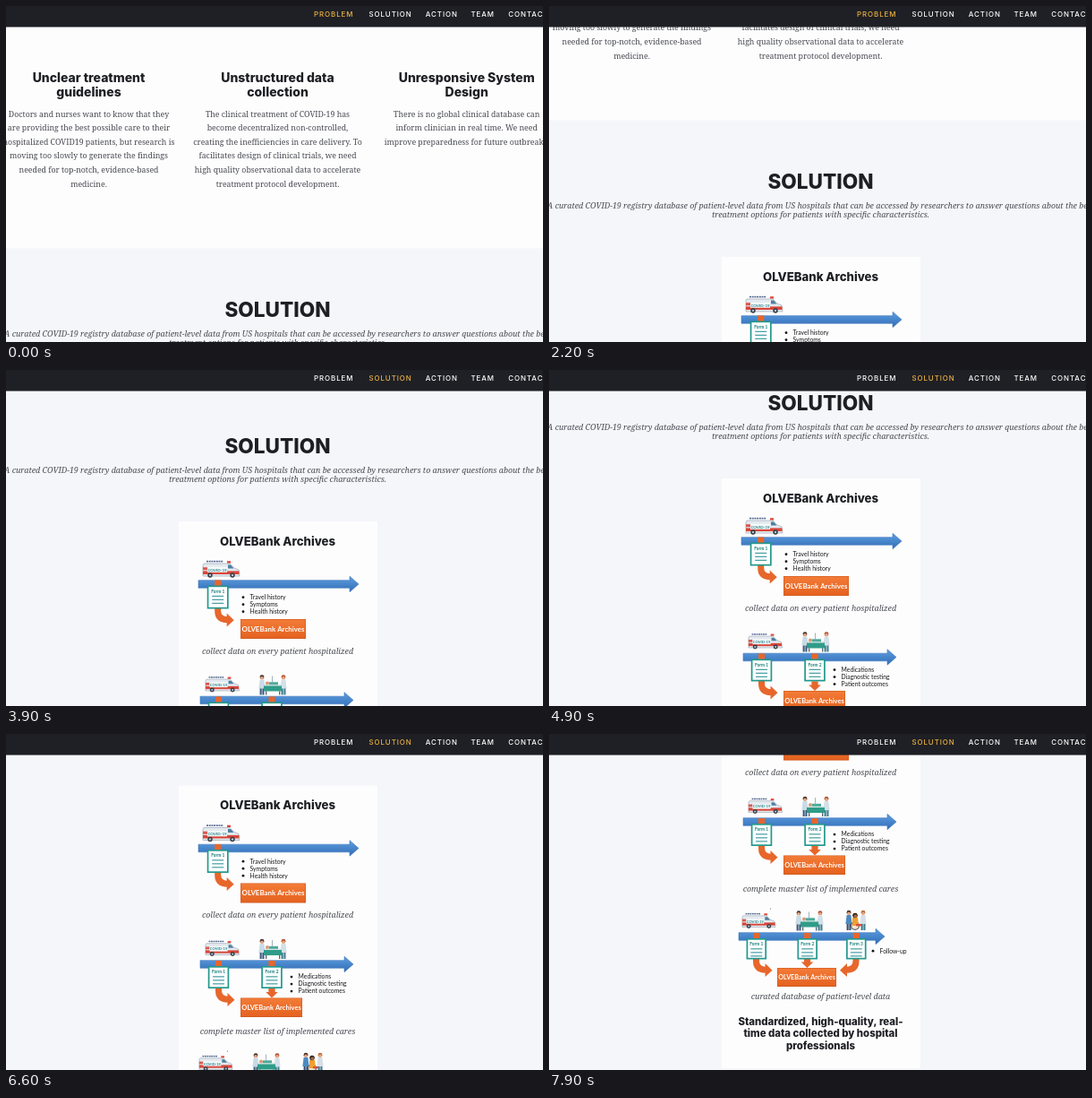
Animation of 600x375 px, one loop 8 s. Source, as an HTML page with a canvas:

```html
<!DOCTYPE html>
<html lang="en">
<head>
<meta charset="utf-8">
<title>Health registry page</title>
<style>
  html, body { margin: 0; width: 100%; height: 100%; overflow: hidden; background: #f5f6fa; }
  canvas { display: block; width: 600px; height: 375px; }
</style>
</head>
<body>
<canvas id="stage"></canvas>
<script>
const W = 600, H = 375, LOOP = 8000, STEP = 100;
const canvas = document.getElementById('stage');
const ctx = canvas.getContext('2d');
const ratio = window.devicePixelRatio || 1;
canvas.width = W * ratio;
canvas.height = H * ratio;

const HEAD = 'Inter, sans-serif', BODY = '"Noto Serif", serif', LABEL = 'Lato, sans-serif';
const INK = '#1d1f23', GREY = '#464a50', TEAL = '#23988c', ORANGE = '#e7662b';
const BRAND = 'OLVEBank Archives';
const MID = 303.5;

// Scroll distance at given times, joined by a monotone cubic curve.
const KEYS = [[0, 0], [700, 54], [900, 54], [1300, 80], [1400, 80], [2200, 143], [2900, 217],
  [3900, 254], [4900, 302], [6600, 365.5], [7700, 517.5], [7900, 524.5]];
const rate = i => (KEYS[i + 1][1] - KEYS[i][1]) / (KEYS[i + 1][0] - KEYS[i][0]);

function slope(i) {
  if (i === 0) return rate(0);
  if (i === KEYS.length - 1) return rate(i - 1);
  const a = rate(i - 1), b = rate(i);
  return a * b > 0 ? 2 * a * b / (a + b) : 0;
}

function scrollAt(t) {
  const last = KEYS.length - 2;
  let i = 0;
  while (i < last && t > KEYS[i + 1][0]) i++;
  const [t0, y0] = KEYS[i], [t1, y1] = KEYS[i + 1];
  const d = t1 - t0, u = Math.min(1, (t - t0) / d), v = 1 - u;
  return y0 * (1 + 2 * u) * v * v + slope(i) * d * u * v * v
    + y1 * u * u * (3 - 2 * u) - slope(i + 1) * d * u * u * v;
}

function text(str, x, y, font, color, align = 'left', spacing = 0) {
  ctx.font = font;
  ctx.fillStyle = color;
  ctx.textAlign = align;
  ctx.letterSpacing = spacing + 'px';
  ctx.fillText(str, x, y);
}

function lines(list, x, y, pitch, font, color) {
  list.forEach((str, i) => text(str, x, y + i * pitch, font, color, 'center'));
}

function rect(x, y, w, h, color) {
  ctx.fillStyle = color;
  ctx.fillRect(x, y, w, h);
}

function poly(points, color, edge) {
  ctx.fillStyle = color;
  ctx.beginPath();
  points.forEach(([x, y]) => ctx.lineTo(x, y));
  ctx.closePath();
  ctx.fill();
  if (edge) {
    ctx.strokeStyle = edge;
    ctx.lineWidth = .6;
    ctx.stroke();
  }
}

function disc(x, y, r, color) {
  ctx.fillStyle = color;
  ctx.beginPath();
  ctx.arc(x, y, r, 0, Math.PI * 2);
  ctx.fill();
}

function shade(y0, y1, top, bottom) {
  const g = ctx.createLinearGradient(0, y0, 0, y1);
  g.addColorStop(0, top);
  g.addColorStop(1, bottom);
  return g;
}

function problemSection() {
  rect(0, 0, W, 270.3, '#fefdfe');
  const columns = [
    [92.5, ['Unclear treatment', 'guidelines'],
      ['Doctors and nurses want to know that they', 'are providing the best possible care to their',
        'hospitalized COVID19 patients, but research is', 'moving too slowly to generate the findings',
        'needed for top-notch, evidence-based', 'medicine.']],
    [MID, ['Unstructured data', 'collection'],
      ['The clinical treatment of COVID-19 has', 'become decentralized non-controlled,',
        'creating the inefficiencies in care delivery. To', 'facilitates design of clinical trials, we need',
        'high quality observational data to accelerate', 'treatment protocol development.']],
    [514.7, ['Unresponsive System', 'Design'],
      ['There is no global clinical database can', 'inform clinician in real time. We need',
        'improve preparedness for future outbreaks.']]
  ];
  for (const [x, title, body] of columns) {
    lines(title, x, 85, 16, `800 14px ${HEAD}`, INK);
    lines(body, x, 123.5, 15.6, `400 8.76px ${BODY}`, GREY);
  }
}

function ambulance(x, y, w) {
  ctx.save();
  ctx.translate(x, y);
  ctx.scale(w / 42, w / 42);
  for (let i = 0; i < 7; i++) rect(5 + i * 2.7, .8, 2, 1.6, '#4f668f');
  rect(28, 1.2, 4, 2.4, '#e2483d');
  poly([[2, 4], [31, 4], [36, 9], [41, 11], [42, 18], [1, 18], [1, 6]], '#e4eaef', '#8d9cab');
  poly([[29, 5.6], [32, 5.6], [35.5, 9.5], [29, 9.5]], '#4f7f9f');
  rect(1, 8.2, 5, 3, '#d9584b');
  rect(1, 12.4, 40.5, 3.6, '#d8463a');
  rect(6, 7.8, 22, 6, '#f4fafa');
  text('COVID-19', 17, 12.5, `700 4.5px ${LABEL}`, '#277f8a', 'center');
  for (const cx of [9, 34]) {
    disc(cx, 17, 2.7, '#343b46');
    disc(cx, 17, 1.2, '#b9c3cc');
  }
  ctx.restore();
}

function person(x, y, coat, legs, hair, skin = '#e6a884') {
  rect(x - 2.4, y + 13, 2.1, 9, legs);
  rect(x + .4, y + 13, 2.1, 9, legs);
  poly([[x - 2.4, y + 5], [x + 2.4, y + 5], [x + 3.6, y + 15], [x - 3.6, y + 15]], coat);
  disc(x, y + 2.2, 2.4, hair);
  disc(x, y + 3.2, 1.8, skin);
}

function doctors(x, y) {
  person(x + 5, y, '#c9dbe6', '#3c5a7c', '#4a3128');
  person(x + 29, y, '#d3e0e8', '#3f7f91', '#b4532f');
  rect(x + 8, y + 10, 18, 3, '#dfeae8');
  rect(x + 7, y + 12, 20, 6, '#2f9c89');
  rect(x + 9, y + 18, 1.3, 4, '#566');
  rect(x + 24, y + 18, 1.3, 4, '#566');
  disc(x + 11, y + 9, 2, '#d89a78');
  rect(x + 13, y + 7.8, 10, 3, '#4cab9d');
  rect(x + 16, y + 1, .8, 8, '#8aa1aa');
}

function patients(x, y) {
  person(x + 4, y + 2, '#4c8ac0', '#344c6c', '#473128');
  person(x + 20, y + 2, '#d5e0e6', '#3c7b8f', '#bd6b32');
  disc(x + 11, y + 19, 5, '#58606a');
  disc(x + 11, y + 19, 3.8, '#f5e4cf');
  poly([[x + 8, y + 10], [x + 14, y + 10], [x + 15, y + 19], [x + 8, y + 19]], '#f0a02f');
  rect(x + 12, y + 17, 6, 2.4, '#d9503e');
  disc(x + 11, y + 7.5, 2.8, '#392720');
  disc(x + 11.4, y + 8.3, 1.8, '#a76b48');
}

function timeline(x0, x1, y) {
  const fill = shade(y - 7, y + 7, '#5a9add', '#3671ba');
  poly([[x0, y - 4.3], [x1 - 10, y - 4.3], [x1 - 10, y - 8.7], [x1, y],
    [x1 - 10, y + 8.7], [x1 - 10, y + 4.3], [x0, y + 4.3]], fill, '#3c76bd');
}

function form(cx, y, w, h, n) {
  rect(cx - 3.6, y - 6, 7.2, 7, ORANGE);
  rect(cx - w / 2, y, w, h, TEAL);
  rect(cx - w / 2 + 1.7, y + 1.7, w - 3.4, h - 3.4, '#fcffff');
  text('Form ' + n, cx, y + 8.2, `700 4.8px ${LABEL}`, '#1b7f79', 'center');
  for (let i = 0; i < 3; i++) rect(cx - 6.5, y + 11.3 + i * 4, 13, 1.1, '#36949a');
}

// Bent arrow from under a form towards the box; dir is 1 for right, -1 for left.
function bend(cx, y, dir) {
  ctx.save();
  ctx.translate(cx, y);
  ctx.scale(dir, 1);
  ctx.strokeStyle = ORANGE;
  ctx.lineWidth = 7;
  ctx.beginPath();
  ctx.moveTo(0, 0);
  ctx.lineTo(0, 3);
  ctx.quadraticCurveTo(0, 12.5, 10.5, 12.8);
  ctx.stroke();
  poly([[10, 5.5], [18, 13.2], [10, 20.5]], ORANGE);
  ctx.restore();
}

function drop(cx, y) {
  poly([[cx - 3.6, y], [cx + 3.6, y], [cx + 3.6, y + 4], [cx + 6.8, y + 4], [cx, y + 10.5],
    [cx - 6.8, y + 4], [cx - 3.6, y + 4]], ORANGE);
}

function box(x, y, w, h, size) {
  rect(x, y, w, h, '#cf5b20');
  rect(x + .6, y + .6, w - 1.2, h - 1.4, shade(y, y + h, '#f37c38', '#e4611f'));
  text(BRAND, x + w / 2, y + h / 2 + 2.8, `700 ${size}px ${LABEL}`, '#fff', 'center');
}

function bullets(list, x, y) {
  list.forEach((str, i) => {
    const cy = y + i * 8;
    disc(x, cy, 1.4, '#111');
    text(str, x + 7.6, cy + 2.3, `400 6.8px ${LABEL}`, '#16181a');
  });
}

function caption(str, y) {
  text(str, MID, y, `italic 400 8.88px ${BODY}`, GREY, 'center');
}

function card() {
  rect(193, 0, 222, 474.5, '#fefdfe');
  text(BRAND, MID, 26.6, `800 13.2px ${HEAD}`, INK, 'center');

  timeline(215, 394, 70);
  ambulance(219, 43, 42);
  bend(236.7, 97, 1);
  form(236.7, 71.5, 24, 26, 1);
  bullets(['Travel history', 'Symptoms', 'Health history'], 265, 84.7);
  box(262, 109, 73, 22, 7.9);
  caption('collect data on every patient hospitalized', 147.7);

  timeline(217, 388, 199.5);
  ambulance(222, 172.5, 38.5);
  doctors(281, 171.5);
  bend(237.5, 226, 1);
  drop(297, 226.5);
  form(237.5, 201.5, 23.5, 25, 1);
  form(297, 201.5, 23.5, 25, 2);
  bullets(['Medications', 'Diagnostic testing', 'Patient outcomes'], 319, 213.6);
  box(262, 237, 69, 21.5, 7.5);
  caption('complete master list of implemented cares', 277.6);

  timeline(212, 375, 327.5);
  ambulance(215, 300.7, 38);
  disc(247.5, 296.5, .6, '#555');
  doctors(274, 299);
  patients(331, 296.5);
  bend(231.5, 352, 1);
  bend(343, 352, -1);
  drop(288.5, 352);
  [231.8, 288.7, 343.3].forEach((x, i) => form(x, 329.5, 22.5, 23.5, i + 1));
  bullets(['Follow-up'], 362, 343.7);
  box(255, 362.5, 66, 21, 7.2);
  caption('curated database of patient-level data', 397.5);

  lines(['Standardized, high-quality, real-', 'time data collected by hospital', 'professionals'],
    MID, 426.6, 13.3, `800 11.4px ${HEAD}`, INK);
}

function solutionSection() {
  text('SOLUTION', MID, 346.6, `800 22.6px ${HEAD}`, INK, 'center');
  lines(['A curated COVID-19 registry database of patient-level data from US hospitals that can be '
    + 'accessed by researchers to answer questions about the best',
    'treatment options for patients with specific characteristics.'],
    MID, 369, 10.4, `italic 400 8.9px ${BODY}`, GREY);
  ctx.translate(0, 423);
  card();
}

function navBar(active) {
  rect(0, 0, W, 23.5, '#1f2025');
  const items = [['PROBLEM', 344], ['SOLUTION', 405.4], ['ACTION', 468.8], ['TEAM', 519.4], ['CONTACT', 561.3]];
  for (const [name, x] of items) {
    text(name, x, 12, `500 7.9px ${HEAD}`, name === active ? '#edb140' : '#fff', 'left', .95);
  }
}

function draw(now) {
  const t = Math.floor((now % LOOP) / STEP) * STEP;
  const offset = scrollAt(t);
  ctx.setTransform(ratio, 0, 0, ratio, 0, 0);
  rect(0, 0, W, H, '#f5f6fa');
  ctx.save();
  ctx.translate(0, -offset);
  problemSection();
  solutionSection();
  ctx.restore();
  navBar(offset < 240 ? 'PROBLEM' : 'SOLUTION');
}

const start = performance.now();
function tick() {
  draw(performance.now() - start);
  requestAnimationFrame(tick);
}
tick();
</script>
</body>
</html>
```
